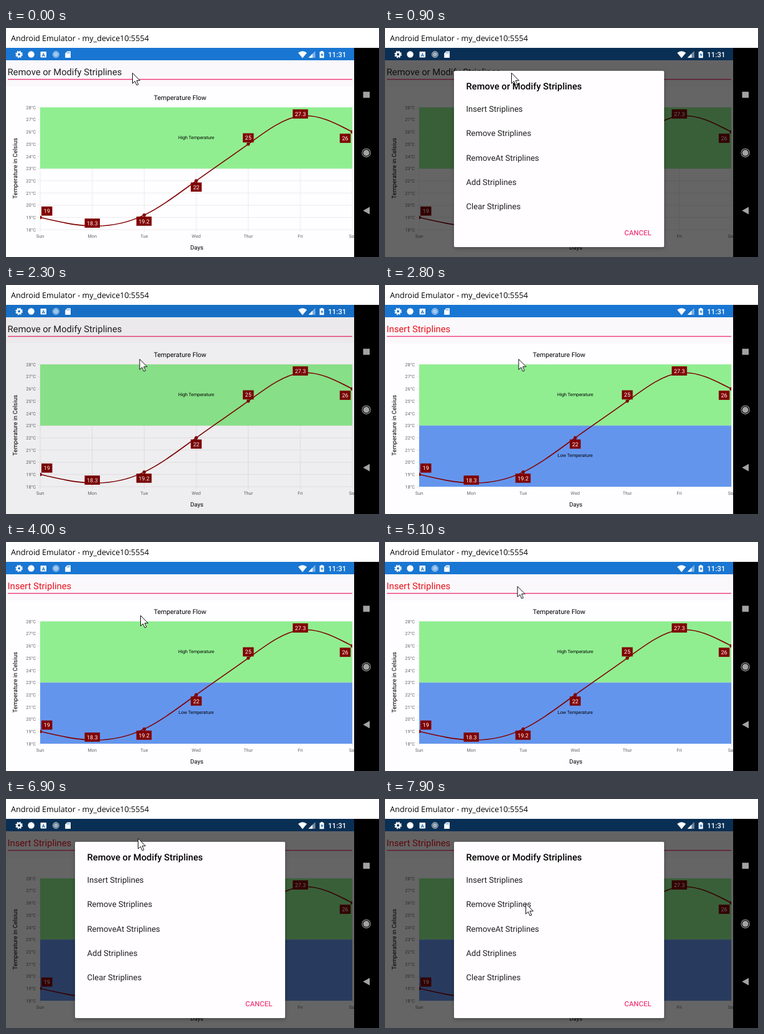
Animation of 600 by 369 pixels, one loop 8000 ms. Source, as an HTML page:

```html
<!DOCTYPE html>
<html lang="en">
<head>
<meta charset="utf-8">
<title>Striplines demo</title>
<style>
  html, body { margin: 0; width: 100%; height: 100%; overflow: hidden; background: #fff; }
  svg { display: block; width: 100vw; height: 100vh; }
  text { font-family: Roboto, sans-serif; text-rendering: geometricPrecision; }
  .window-title { font: 12.6px "Open Sans", sans-serif; }
  .field { font-size: 14.75px; }
  .heading { font-size: 10.55px; text-anchor: middle; }
  .axis { font-size: 9.6px; text-anchor: middle; }
  .small { font-size: 7.3px; }
  .mid { text-anchor: middle; }
  .end { text-anchor: end; }
  .value { font-size: 9.1px; fill: #fff; text-anchor: middle; }
  .item { font-size: 13.1px; fill: #212121; }
  .medium { font-weight: 500; }

  .before, .after, .scrim, .dialog, .cursor { animation: 8s linear infinite; }
  .before { animation-name: before; animation-timing-function: step-end; }
  .after { animation-name: after; animation-timing-function: step-end; }
  .scrim { animation-name: scrim; }
  .dialog { animation-name: dialog; transform-origin: 280px 211px; }
  .cursor { animation-name: cursor; }

  @keyframes before { 0% { opacity: 1; } 31.2%, 100% { opacity: 0; } }
  @keyframes after { 0% { opacity: 0; } 31.2%, 100% { opacity: 1; } }
  @keyframes scrim {
    0%, 1.25% { opacity: 0; }
    5%, 27% { opacity: 1; }
    28.97%, 80.6% { opacity: 0; }
    84.4%, 100% { opacity: 1; }
  }
  @keyframes dialog {
    0%, 1.25% { opacity: 0; transform: scale(.92); animation-timing-function: ease-out; }
    4.4%, 27% { opacity: 1; transform: none; }
    28.5% { opacity: 0; transform: none; }
    28.6%, 80.6% { opacity: 0; transform: scale(.92); animation-timing-function: ease-out; }
    83.8%, 100% { opacity: 1; transform: none; }
  }
  @keyframes cursor {
    0%, 11.5% { transform: translate(203px, 72px); animation-timing-function: ease-in-out; }
    18.5%, 38% { transform: translate(214.5px, 119px); }
    40%, 57% { transform: translate(216px, 118px); animation-timing-function: ease-in-out; }
    66.2%, 90.6% { transform: translate(212px, 63px); animation-timing-function: ease-in-out; }
    96.5%, 100% { transform: translate(226px, 168px); }
  }
</style>
</head>
<body>
<svg viewBox="0 0 600 369" preserveAspectRatio="none">
  <defs>
    <clipPath id="screen"><rect y="32" width="560" height="337"/></clipPath>
    <clipPath id="plot"><rect x="55" y="120" width="502" height="210"/></clipPath>
    <filter id="shadow" x="-10%" y="-10%" width="120%" height="120%">
      <feDropShadow dx="0" dy="2" stdDeviation="3" flood-opacity=".25"/>
    </filter>
  </defs>

  <rect width="600" height="369" fill="#fff"/>
  <text class="window-title" x="8" y="21">Android Emulator - my_device10:5554</text>

  <g clip-path="url(#screen)">
    <rect y="32" width="560" height="337" fill="#fefdff"/>
    <rect y="52" width="560" height="42" fill="#fbf8fb"/>
    <rect y="32" width="560" height="20" fill="#1976d2"/>
    <text class="field before" x="2.5" y="76" fill="#212121">Remove or Modify Striplines</text>
    <text class="field after" x="2.5" y="76" fill="#e8121c">Insert Striplines</text>
    <rect x="3" y="82" width="554" height="1.5" fill="#f0487f"/>

    <g id="grid" stroke="#e8e8e8" stroke-width=".8"></g>
    <rect x="55" y="128" width="502" height="98.5" fill="#90ee90"/>
    <rect class="after" x="55" y="226.5" width="502" height="98.5" fill="#6495ed"/>
    <text class="small mid" x="306" y="179">High Temperature</text>
    <text class="small mid after" x="306" y="277">Low Temperature</text>
    <text class="heading" x="280" y="115.5">Temperature Flow</text>
    <text class="axis" x="307" y="357">Days</text>
    <text class="axis" transform="translate(18 226) rotate(-90)">Temperature in Celsius</text>
    <g id="ticks" fill="#666"></g>
    <g id="series" clip-path="url(#plot)" fill="#800000"></g>
    <g id="values" fill="#800000"></g>
  </g>

  <rect class="scrim" y="32" width="560" height="337" fill="rgba(0,0,0,.6)"/>

  <g fill="#fff">
    <circle cx="21" cy="42.5" r="3.2" fill="none" stroke="#fff" stroke-width="2.6"/>
    <circle cx="21" cy="42.5" r="5" fill="none" stroke="#fff" stroke-width="1.8" stroke-dasharray="2.1 1.83"/>
    <circle cx="40.5" cy="42.5" r="5.2"/>
    <rect x="55.5" y="38" width="9.5" height="9.5" rx="1"/>
    <text x="60.2" y="45.6" font-size="7.5" font-weight="700" fill="#1566b5" text-anchor="middle">A</text>
    <g stroke="#fff" fill="#fff" fill-opacity=".35" stroke-opacity=".55">
      <circle cx="80.3" cy="42.6" r="5"/>
      <circle cx="80.3" cy="42.6" r="2.5"/>
    </g>
    <path d="M98.5 37.5h5.5v10.5h-8.8v-7.3z"/>
    <path d="M98.6 39v2m1.7-2v2m1.7-2v2" stroke="#1976d2" stroke-width=".8"/>
    <path d="M470 40Q477 34.5 484 40L477 48.5z"/>
    <path d="M497.5 37v11h-11z" opacity=".45"/>
    <path d="M493 41.5v6.5h-6.5z"/>
    <path d="M504.5 38.3h2v-1.3h3v1.3h2v9.9h-7z"/>
    <path d="M508.7 39.8l-2.5 4h1.7v3l2.5-4.2h-1.7z" fill="#1976d2"/>
    <text class="medium" x="518" y="46.8" font-size="11.6">11:31</text>
  </g>

  <rect x="560" y="32" width="40" height="337"/>
  <g fill="#a3a3a3">
    <rect x="574.5" y="102.7" width="10.5" height="9.8"/>
    <circle cx="579.6" cy="201.2" r="4.9"/>
    <circle cx="579.6" cy="201.2" r="6.7" fill="none" stroke="#a3a3a3" stroke-width="1.1"/>
    <path d="M574.3 294.3L585 288.3v12z"/>
  </g>

  <g class="dialog">
    <rect x="111" y="69" width="338" height="284" rx="2" fill="#fffdff" filter="url(#shadow)"/>
    <text class="medium" x="130.5" y="99.3" font-size="14.75">Remove or Modify Striplines</text>
    <g id="items"></g>
    <text class="medium" x="385" y="334.4" font-size="11.45" fill="#f0417c">CANCEL</text>
  </g>

  <path class="cursor" d="M.5 .5V17.3L4.4 13.7L7.2 20.1L9.9 19L7.1 12.7H12.4z"
        fill="#fff" stroke="#111" stroke-width="1"/>
</svg>

<script>
  const days = ['Sun', 'Mon', 'Tue', 'Wed', 'Thur', 'Fri', 'Sat'];
  const temps = [19, 18.3, 19.2, 22, 25, 27.3, 26];
  const labelCenters = [[65.7, 295], [138.8, 314.4], [222, 311.3], [306, 256.3], [389.7, 177], [473.5, 138.5], [545.6, 177.7]];
  const choices = ['Insert', 'Remove', 'RemoveAt', 'Add', 'Clear'];
  const step = 502 / 6;
  const px = i => 55 + i * step;
  const py = t => 325 - (t - 18) * 19.7;

  function add(parentId, tag, attrs, content = '') {
    const el = document.createElementNS('http://www.w3.org/2000/svg', tag);
    for (const key in attrs) el.setAttribute(key, attrs[key]);
    el.textContent = content;
    document.getElementById(parentId).append(el);
  }

  // Knot slopes of a natural cubic spline, relaxed until they settle.
  function splineSlopes(y) {
    const last = y.length - 1, d = y.map(() => 0);
    for (let pass = 0; pass < 50; pass++) {
      d[0] = (3 * (y[1] - y[0]) - d[1]) / 2;
      for (let i = 1; i < last; i++) d[i] = (3 * (y[i + 1] - y[i - 1]) - d[i - 1] - d[i + 1]) / 4;
      d[last] = (3 * (y[last] - y[last - 1]) - d[last - 1]) / 2;
    }
    return d;
  }

  for (let t = 18; t <= 28; t++) {
    add('grid', 'path', { d: `M51 ${py(t)}H557` });
    add('ticks', 'text', { class: 'small end', x: 48, y: py(t) + 2.7 }, t + '°C');
  }

  days.forEach((day, i) => {
    add('grid', 'path', { d: `M${px(i)} 128V329` });
    add('ticks', 'text', { class: 'small mid', x: px(i), y: 338 }, day);
  });

  const ys = temps.map(py), slopes = splineSlopes(ys);
  let curve = `M${px(0)} ${ys[0]}`;
  for (let i = 1; i < ys.length; i++) {
    curve += `C${px(i - 1) + step / 3} ${ys[i - 1] + slopes[i - 1] / 3} ${px(i) - step / 3} ${ys[i] - slopes[i] / 3} ${px(i)} ${ys[i]}`;
  }
  add('series', 'path', { d: curve, fill: 'none', stroke: '#800000', 'stroke-width': 1.6 });

  temps.forEach((t, i) => {
    add('series', 'circle', { cx: px(i), cy: ys[i], r: 2.7 });
    const [x, y] = labelCenters[i], w = Number.isInteger(t) ? 17.5 : 24.5;
    add('values', 'rect', { x: x - w / 2, y: y - 7.4, width: w, height: 14.8 });
    add('values', 'text', { class: 'value', x, y: y + 3.2 }, t);
  });

  choices.forEach((name, i) => {
    add('items', 'text', { class: 'item', x: 130.5, y: 135 + i * 39.3 }, name + ' Striplines');
  });
</script>
</body>
</html>
```
